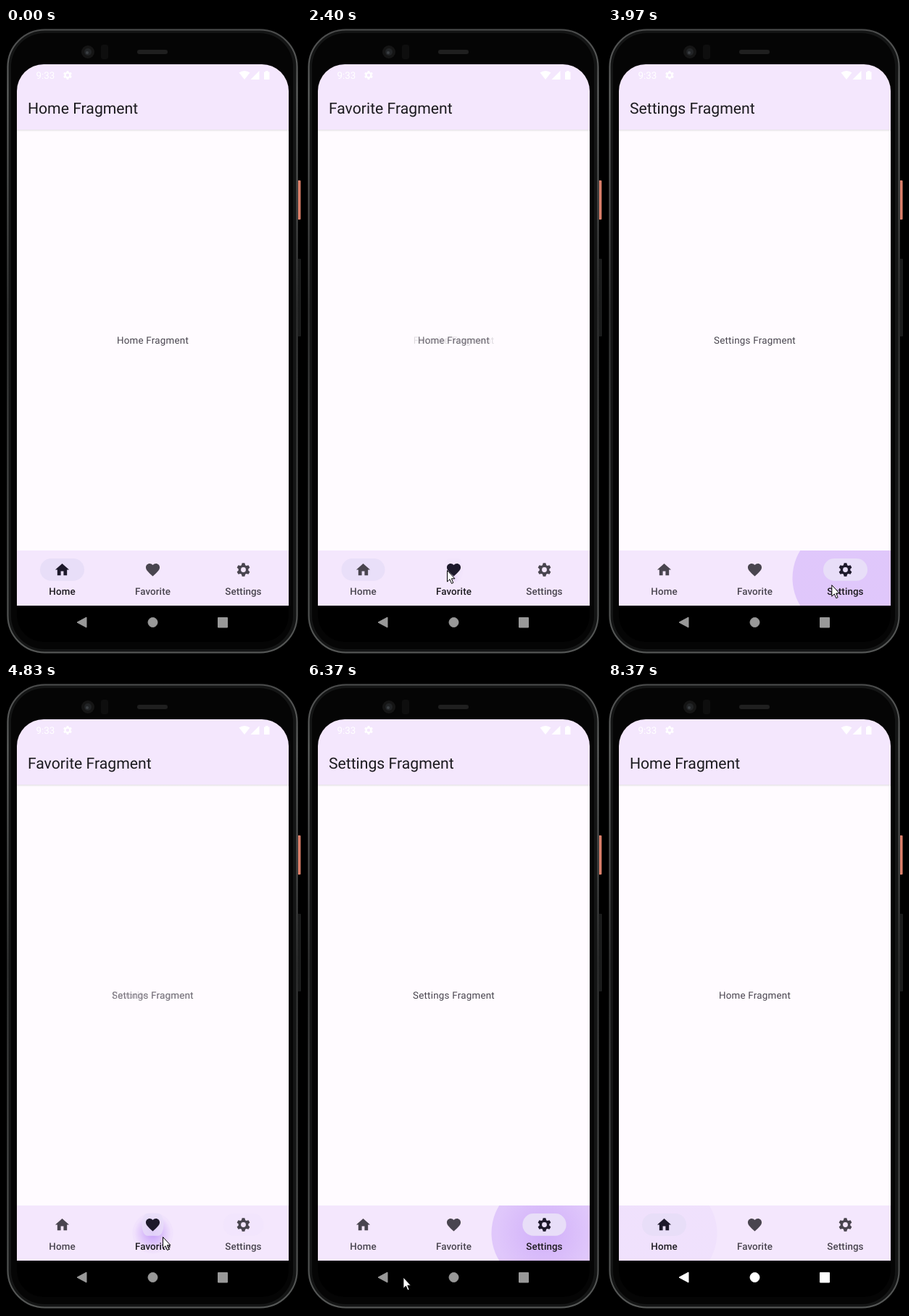
An HTML page for the animation above (9.03 s loop, 407x864 px).

```html
<!DOCTYPE html>
<html lang="en">
<head>
<meta charset="utf-8">
<title>Bottom navigation</title>
<style>
html, body { margin: 0; width: 100%; height: 100%; overflow: hidden; background: #000; }
svg { display: block; width: 100%; height: 100%; }
text { font-family: Roboto, sans-serif; text-rendering: geometricPrecision; }
.title { font-size: 21.2px; fill: #1c1b1f; }
.body { font-size: 13.36px; letter-spacing: .24px; fill: #49454f; text-anchor: middle; }
.label { font-size: 13.36px; font-weight: 500; letter-spacing: .1px; text-anchor: middle; }
</style>
</head>
<body>
<svg viewBox="0 0 407 864">
  <defs>
    <linearGradient id="edge" x2="0" y2="1">
      <stop stop-color="#4a4b4b"/><stop offset=".1" stop-color="#646665"/>
      <stop offset=".45" stop-color="#303131"/><stop offset="1" stop-color="#565857"/>
    </linearGradient>
    <linearGradient id="shade" x2="0" y2="1">
      <stop stop-color="#000" stop-opacity=".1"/><stop offset="1" stop-color="#000" stop-opacity="0"/>
    </linearGradient>
    <radialGradient id="glow">
      <stop id="core" stop-color="#6200ee"/>
      <stop id="rim" offset=".9" stop-color="#6200ee"/>
    </radialGradient>
    <clipPath id="screen"><rect x="15" y="50" width="375" height="796" rx="37"/></clipPath>
    <clipPath id="bar"><rect x="15" y="720" width="375" height="76"/></clipPath>
  </defs>

  <!-- phone -->
  <rect x="402" y="210" width="4.500" height="54" rx="1" fill="#dc806b"/>
  <rect x="402" y="318" width="5" height="107" rx="1" fill="#1a1b1b"/>
  <rect x="1" y="1" width="402" height="861" rx="53" fill="#151616"/>
  <rect x="2.500" y="2.500" width="399" height="858" rx="51" fill="#141515" stroke="url(#edge)" stroke-width="2"/>
  <rect x="7" y="7" width="389" height="849" rx="46" fill="#050505"/>
  <circle cx="113" cy="33" r="9" fill="#151515"/>
  <circle cx="113" cy="33" r="5" fill="#222426"/>
  <circle cx="112" cy="34" r="2" fill="#3c4044"/>
  <rect x="131" y="23" width="10" height="20" rx="3" fill="#0e0e0e"/>
  <rect x="181" y="30" width="42" height="6" rx="3" fill="#1f1f1f"/>

  <g clip-path="url(#screen)">
    <rect x="15" y="50" width="375" height="796"/>
    <rect x="15" y="140" width="375" height="580" fill="#fffbff"/>
    <rect x="15" y="50" width="375" height="90" fill="#f4e7fd"/>
    <rect x="15" y="140" width="375" height="3" fill="url(#shade)"/>
    <rect x="15" y="720" width="375" height="76" fill="#f4e7fd"/>
  </g>

  <!-- status bar -->
  <g fill="#fff">
    <text x="41.500" y="70" font-size="13.400">9:33</text>
    <path id="cog" fill-rule="evenodd" transform="translate(85 65) scale(.62)"/>
    <path d="M329 71L321.500 61.500Q329 56.500 336.500 61.500Z"/>
    <path d="M337.500 71L349.500 59V71Z"/>
    <path d="M356 60.500H358V59H361.500V60.500H363.500V71H356Z"/>
  </g>

  <text class="title" id="title" x="29.900" y="118"></text>
  <g id="bodies"></g>
  <g clip-path="url(#bar)"><circle id="ripple" cy="758" fill="url(#glow)"/></g>
  <g id="tabs"></g>

  <g id="keys" stroke-linejoin="round">
    <path d="M98 819L111 812V826Z"/>
    <circle cx="202.500" cy="819" r="6.500"/>
    <rect x="292.500" y="812.500" width="13" height="13.500"/>
  </g>

  <path id="cursor" d="M.5.5V16L4 12.700 6.500 18.500 8.800 17.500 6.400 11.800H11Z" fill="#fff" stroke="#000"/>
</svg>
<script>
const LOOP = 9030;
const NAMES = ['Home', 'Favorite', 'Settings'];
// Start, tab, end of the ripple, strength the ripple keeps until the next tap.
// The entry without a ripple is the back key.
const TAPS = [[-2000, 0, -2000, 0], [1375, 0, 2030, 0], [2367, 1, 2630, .7], [3445, 2, 4300, 0],
  [4770, 1, 5130, .7], [6095, 2, 6650, 0], [6650, 0, 6650, 0], [7615, 0, 8370, .2]];
// Pointer: start, duration, x, y of the place it goes to
const MOVES = [[0, 0, 15, 696], [530, 300, 90, 747], [1730, 300, 193, 747], [2770, 400, 349, 769],
  [3835, 370, 216, 763], [5270, 260, 142, 817], [5670, 200, 334, 764], [6180, 240, 108, 825],
  [7030, 370, 79, 752], [7900, 140, 110, 683], [8040, 210, 150, 870]];

const $ = id => document.getElementById(id);
const clamp = v => Math.min(1, Math.max(0, v));
const smooth = v => v * v * (3 - 2 * v);
const tabX = i => 77.5 + 125 * i;
const lastBefore = (list, t) => list.findLastIndex(k => k[0] <= t);

function set(el, attrs) {
  for (const key in attrs) el.setAttribute(key, attrs[key]);
  return el;
}
function add(parent, tag, attrs, text = '') {
  const el = set(document.createElementNS('http://www.w3.org/2000/svg', tag), attrs);
  el.textContent = text;
  return parent.appendChild(el);
}

function gear() {
  const pts = [];
  for (let a = 30; a < 390; a += 60)
    for (const [r, d] of [[7.2, -22.5], [9.8, -11.3], [9.8, 11.3], [7.2, 22.5]]) {
      const rad = (a + d) * Math.PI / 180;
      pts.push(r * Math.cos(rad) + ' ' + r * Math.sin(rad));
    }
  return 'M' + pts.join('L') + 'ZM3.6 0A3.6 3.6 0 1 0-3.6 0A3.6 3.6 0 1 0 3.6 0Z';
}

const ICONS = [
  'M-2 8V2H2V8H7V0H10L0-9-10 0H-7V8Z',
  'M0 9.35C-6.6 3.4-10 .3-10-3.5-10-6.6-7.6-9-4.5-9Q-1.8-9 0-6.9 1.8-9 4.5-9C7.6-9 10-6.6 10-3.5 10 .3 6.6 3.4 0 9.35Z',
  gear()
];
set($('cog'), { d: ICONS[2] });

const tabs = NAMES.map((name, i) => ({
  body: add($('bodies'), 'text', { class: 'body', x: 202.5, y: 435 }, name + ' Fragment'),
  pill: add($('tabs'), 'rect', { x: -30.5, y: -15.3, width: 61, height: 30.6, rx: 15.3, fill: '#e8def8' }),
  icon: add($('tabs'), 'path', { d: ICONS[i], 'fill-rule': 'evenodd',
    transform: `translate(${tabX(i)} 746.5) scale(.954)` }),
  label: add($('tabs'), 'text', { class: 'label', x: tabX(i), y: 781 }, name)
}));

function emphasized(x) {
  return x < 1 / 6 ? .4 * (6 * x) ** 3 : 1 - .6 * (1 - (x - 1 / 6) * 1.2) ** 5.5;
}

function drawTabs(age, now, before) {
  const moved = now !== before;
  const fade = moved ? clamp(age / 200) : 1;
  const grow = moved ? emphasized(clamp(age / 500)) : 1;
  $('title').textContent = NAMES[now] + ' Fragment';
  tabs.forEach(({ body, pill, icon, label }, i) => {
    const on = i === now, off = i === before;
    const size = on ? grow : 1 - grow;
    set(body, { opacity: on ? fade : off ? 1 - fade : 0 });
    set(pill, {
      opacity: on ? clamp(grow / .2) : off ? clamp((size - .8) / .2) : 0,
      transform: `translate(${tabX(i)} 746.4) scale(${.4 + .6 * size} 1)`
    });
    set(icon, { fill: on ? '#1d192b' : '#49454f' });
    set(label, { fill: on ? '#1d1b20' : '#49454f' });
  });
}

function drawRipple(t, [start, tab, end, rest]) {
  const age = Math.max(0, Math.min(t, end) - start - 25);
  const fade = 1 - (1 - rest) * clamp((t - end) / 280 + 1);
  const base = .14 * clamp(age / 220) * fade;
  const boost = .3 * clamp(age / 30) * clamp(1 - (age - 100) / 230) * fade;
  set($('core'), { 'stop-opacity': base + boost });
  set($('rim'), { 'stop-opacity': base });
  set($('ripple'), { cx: tabX(tab), r: 73 * (1 - (1 - clamp(age / 240)) ** 3) });
}

function drawCursor(t) {
  const k = lastBefore(MOVES, t);
  const [start, span, x, y] = MOVES[k];
  const [, , x0, y0] = MOVES[Math.max(0, k - 1)];
  const f = smooth(clamp((t - start) / (span || 1)));
  set($('cursor'), {
    visibility: k > 0 ? 'visible' : 'hidden',
    transform: `translate(${x0 + (x - x0) * f} ${y0 + (y - y0) * f})`
  });
}

function draw(t) {
  const grey = 153 + 102 * clamp((t - 7030) / 170);
  const color = `rgb(${grey},${grey},${grey})`;
  set($('keys'), { fill: color, stroke: color });
  const k = lastBefore(TAPS, t), tap = TAPS[k];
  drawTabs(t - tap[0], tap[1], TAPS[Math.max(0, k - 1)][1]);
  drawRipple(t, tap);
  drawCursor(t);
}

const begin = performance.now();
function tick() {
  draw((performance.now() - begin) % LOOP);
  requestAnimationFrame(tick);
}
tick();
</script>
</body>
</html>
```
